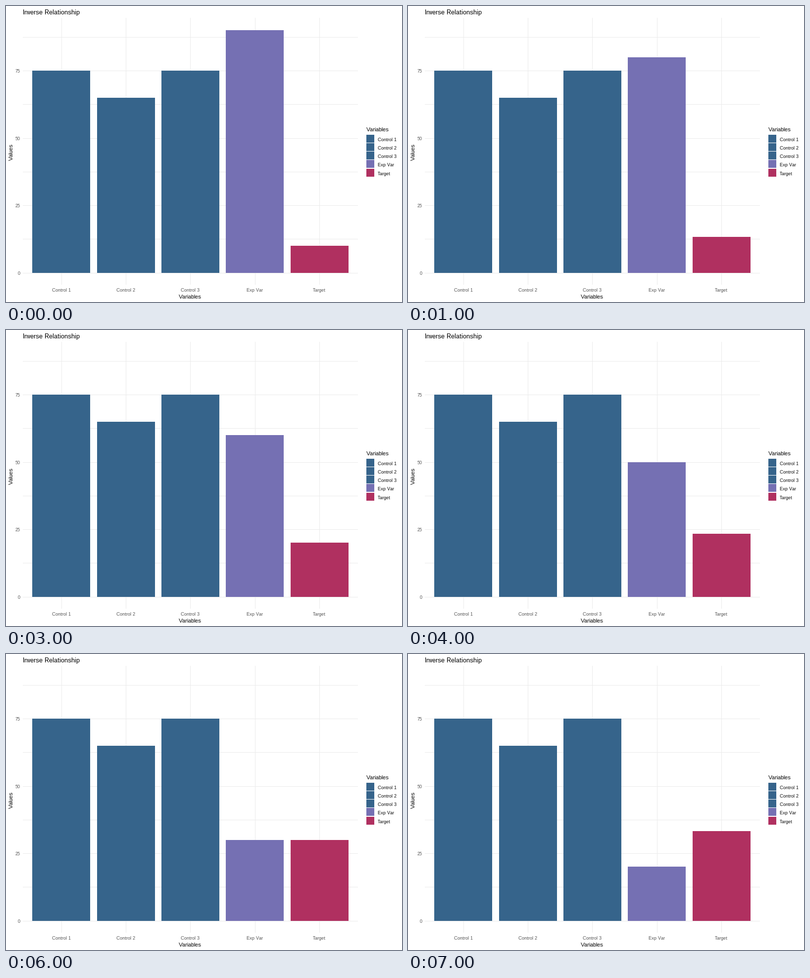
Recreate the animation shown at these times as a matplotlib script. Size 800 by 600 pixels, loop 8 s.

```python
import matplotlib.pyplot as plt
from matplotlib.animation import FuncAnimation
from matplotlib.patches import Rectangle

W, H, DPI = 800, 600, 100
STEPS, STEP_MS = 8, 1000
BLUE, PURPLE, MAROON = "#36648B", "#7570B3", "#B03060"
GRID, GREY = "#EBEBEB", "#4D4D4D"
NAMES = ["Control 1", "Control 2", "Control 3", "Exp Var", "Target"]
COLORS = [BLUE, BLUE, BLUE, PURPLE, MAROON]
LEFTS = [53, 184, 314, 444, 575]
CENTERS = [112, 242, 372, 503, 633]
BAR_W = 117
PANEL = (34, 24, 711, 565)
ZERO_Y, UNIT = 540.75, 541 / 99

plt.rcParams.update({
    "font.family": "Liberation Sans",
    "text.hinting": "native",
    "text.hinting_factor": 1,
})

fig = plt.figure(figsize=(W / DPI, H / DPI), dpi=DPI, facecolor="white")
ax = fig.add_axes([0, 0, 1, 1])
ax.set(xlim=(0, W), ylim=(H, 0))
ax.axis("off")


def y_px(value):
    return round(ZERO_Y - UNIT * value)


def box(x, y, w, h, color, z=1):
    patch = Rectangle((x, y), w, h, facecolor=color, linewidth=0,
                      antialiased=False, zorder=z)
    return ax.add_patch(patch)


def label(x, y, text, px, color="black", ha="left", **kw):
    kw.setdefault("va", "baseline")
    ax.text(x, y, text, fontsize=px * 72 / DPI, color=color, ha=ha, **kw)


def values(step):
    return [75, 65, 75, 90 - 10 * step, 10 + 10 * step / 3]


# Panel grid, major and minor
x0, y0, x1, y1 = PANEL
for i in range(8):
    box(x0, y_px(12.5 * i), x1 - x0, 1, GRID)
for x in CENTERS:
    box(x, y0, 1, y1 - y0, GRID)

bars = [box(x, y_px(0), BAR_W, 0, c, 2) for x, c in zip(LEFTS, COLORS)]

# Titles and axis labels
label(34, 17, "Inverse Relationship", 13)
label(372, 593, "Variables", 11, ha="center")
label(16, 296, "Values", 11, ha="right", va="center", rotation=90)
for v in (0, 25, 50, 75):
    label(29, y_px(v) + 4, str(v), 9, GREY, "right")
for x, name in zip(CENTERS, NAMES):
    label(x, 579, name, 9, GREY, "center")

# Legend
label(728, 254, "Variables", 11)
for i, (name, color) in enumerate(zip(NAMES, COLORS)):
    top = int(261 + 17.28 * i)
    box(728, top, 16, 16, color)
    label(751, top + 13, name, 9)


def update(step):
    for bar, v in zip(bars, values(step)):
        top = y_px(v)
        bar.set_y(top)
        bar.set_height(y_px(0) - top)
    return bars


anim = FuncAnimation(fig, update, frames=STEPS, interval=STEP_MS,
                     init_func=lambda: update(0), repeat=True,
                     repeat_delay=0, blit=False)
plt.show()
```
